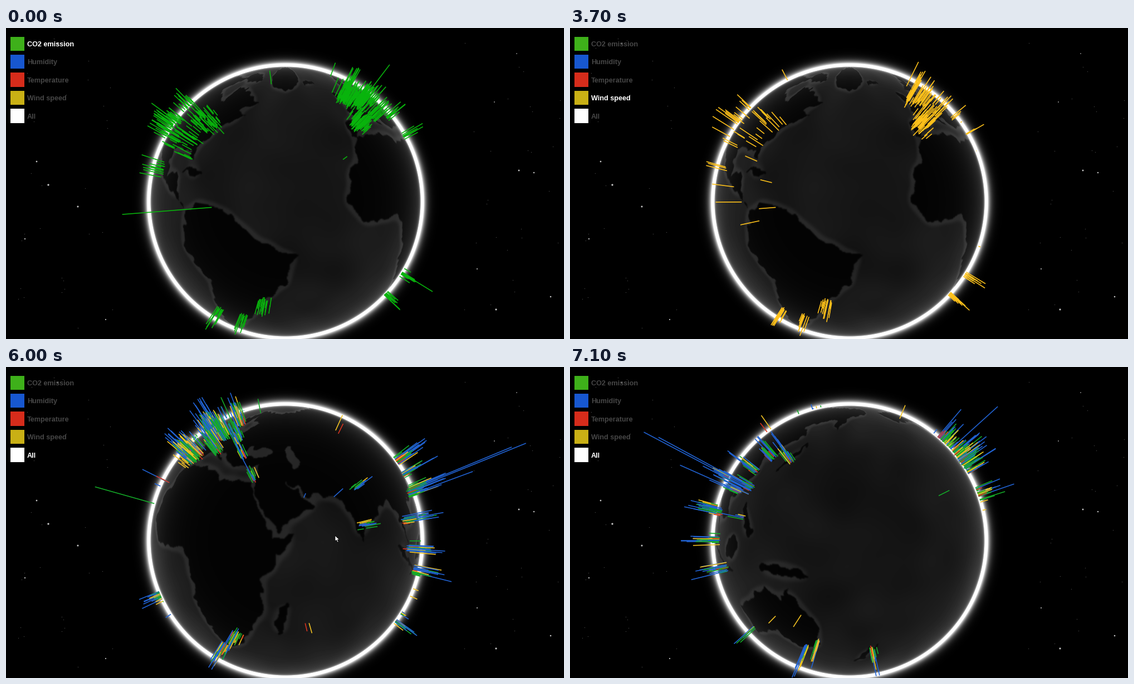
A matplotlib script that plays this animation: 1002 px wide and 559 px high, repeating every 7200 ms.

```python
import numpy as np
import matplotlib.pyplot as plt
from matplotlib.animation import FuncAnimation
from matplotlib.collections import LineCollection
from matplotlib.patches import Polygon, Rectangle
from matplotlib.path import Path

W, H, DPI = 1002, 559, 100
STEP, LOOP = 100, 7200
CX, CY, K = 502, 312, 240      # globe centre and projection scale
P = 0.2                        # globe radius / camera distance
RHO = 1 / np.sqrt(1 - P * P)   # horizon radius in units of K
RIM = K * RHO
PT = 72 / DPI
rng = np.random.default_rng(7)

# ---------- coastlines as (lon, lat) ----------
N_AMERICA = [
    (-168, 66), (-128, 70), (-82, 68), (-94, 59), (-80, 51), (-78, 62), (-64, 58),
    (-56, 52), (-66, 49), (-61, 46), (-70, 42), (-76, 36), (-81, 31), (-80, 26),
    (-84, 30), (-97, 28), (-95, 18), (-88, 21), (-83, 10), (-78, 8), (-94, 16),
    (-106, 22), (-114, 31), (-110, 23), (-117, 32), (-124, 42), (-124, 48), (-140, 60),
    (-158, 57)]
S_AMERICA = [
    (-78, 8), (-72, 12), (-62, 10), (-50, 1), (-36, -5), (-39, -15), (-48, -26),
    (-57, -37), (-66, -46), (-69, -54), (-74, -50), (-70, -19), (-81, -5)]
AFRICA = [
    (-6, 36), (10, 37), (20, 31), (33, 31), (43, 11), (51, 12), (40, -4), (40, -15),
    (33, -27), (26, -34), (19, -34), (12, -17), (13, -8), (9, 4), (-8, 4), (-17, 14),
    (-10, 30)]
EUROPE = [
    (-9, 37), (-9, 43), (-1, 44), (-4, 48), (8, 55), (21, 55), (29, 60), (22, 61),
    (24, 66), (17, 60), (13, 56), (6, 59), (25, 71), (46, 67), (46, 37), (28, 37),
    (23, 38), (13, 45), (17, 39), (9, 44), (0, 39), (-6, 36)]
ASIA = [
    (45, 68), (75, 73), (104, 77), (180, 69), (180, 64), (163, 60), (157, 51), (155, 59),
    (136, 54), (140, 48), (128, 42), (129, 35), (126, 38), (118, 39), (122, 31),
    (114, 22), (107, 20), (109, 12), (100, 13), (103, 1), (98, 15), (91, 22), (80, 15),
    (77, 8), (72, 21), (67, 25), (57, 26), (48, 30), (56, 25), (59, 22), (45, 13),
    (35, 28), (36, 37), (45, 40)]
AUSTRALIA = [
    (114, -22), (116, -34), (131, -31), (140, -38), (149, -38), (153, -27), (146, -19),
    (142, -11), (138, -17), (132, -12), (122, -18)]
LAND = [N_AMERICA, S_AMERICA, AFRICA, EUROPE, ASIA, AUSTRALIA]

# leaning ellipses: lon, lat, half width, half height, lean
ISLANDS = [
    (-40, 72, 14, 12, 0), (-74, 69, 10, 4, -1), (-19, 65, 5, 1.3, 0), (-2.5, 54, 2.3, 4.2, -.4),
    (-79, 22, 5, 1, -1), (46.5, -19, 2.2, 7, .25), (101, -.5, 1.6, 6, -1.1),
    (110, -7.4, 5, .8, 0), (114, 1, 4, 4.5, .5), (123, 12, 1.8, 6, -.4),
    (140, -5.5, 9, 2.4, -1.5), (137.5, 37, 1.6, 6, .9), (173, -41, 1.5, 6, .8)]
SEAS = [(34, 43.5, 7, 2.2, 0), (51, 41.5, 2, 5, -.3)]

# ---------- stations: lat, lon, count; quantities share them by a mix ----------
EUROPE_SITES = [(52.5, -1.5, 130), (50.5, 8, 165), (43.5, 11.5, 45), (59, 14, 40),
                (50, 21, 45), (41, 28, 20), (32, 35, 20)]
AMERICA_SITES = [(40.5, -75.5, 45), (41.5, -86, 55), (33.5, -84, 40), (31.5, -97, 34),
                 (39.5, -106, 20), (35.5, -119.5, 70), (47, -121.5, 24), (27.5, -81.5, 9),
                 (20, -100, 26)]
WINDY_SITES = [(40.2, -3.5, 180), (-34, -71, 34), (-35, -59.5, 28), (-25, -48.5, 50),
               (-26.3, 28, 32), (-33.7, 18.9, 34), (-37.5, 145, 18), (-33.8, 151, 14),
               (-38, 175.5, 18), (-32, 116, 7)]
EAST_SITES = [(27.5, 77, 14), (14, 76.5, 16), (13.8, 100.5, 18), (3, 102, 26),
              (-6.8, 109, 24), (22.8, 113.8, 20), (24, 120.8, 24), (31, 120.5, 18),
              (36.8, 127.5, 18), (35.2, 137.5, 26), (13, 121.5, 6)]
GROUPS = [(EUROPE_SITES, .17, (.52, .22, .13, .13)), (AMERICA_SITES, .34, (.48, .2, .2, .12)),
          (WINDY_SITES, .15, (.37, .23, .1, .3)), (EAST_SITES, .19, (.4, .36, .14, .1))]
RANGES = [(.05, .12), (.07, .2), (.03, .06), (.06, .13)]   # lowest bar, spread

# lone stations: lat, lon, height
CO2 = [(10.5, -67, .82), (64, -51.7, .1), (69, 20, .1), (-26, 28, .25), (52, 18, .3),
       (28, -16, .06), (38.5, -106, .24), (21.3, -157.8, .1)]
HUMIDITY = [(42.5, -112, .445), (18.5, -99.5, .324), (-12, -77, .18), (18.4, -66, .22),
            (9, -79.5, .22), (28, -16, .2), (64, -22, .09), (24, 120.8, .81),
            (24.4, 121, .72), (22.5, 114, .45), (25, 67, .15), (25, 55, .08)]
HEAT = [(28, -15, .1), (-21, 55.5, .08), (53, 83, .08)]
WIND = [(61, -150, .1), (4.7, -74, .17), (10.5, -67, .18), (14.6, -90.5, .16),
        (10, -84, .2), (19, -70, .12), (55, 83, .12), (-21, 57, .1), (-23.7, 134, .08),
        (-22, 146, .13)]

SOLO = ["#08b40c", "#0a5fff", "#ff2a12", "#ffc21a"]
MIXED = ["#14aa28", "#2163d4", "#d93420", "#f3c322"]

LEGEND = [("CO2 emission", "#3eb01a"), ("Humidity", "#1757cf"), ("Temperature", "#d62c1b"),
          ("Wind speed", "#c9b015"), ("All", "#ffffff")]

# brightest first
STARS = [(76, 282), (880, 506), (129, 321), (921, 256), (55, 240), (978, 483), (948, 260),
         (34, 379), (179, 524), (846, 433), (93, 28), (877, 133), (917, 46)]

SWITCHES = [900, 2200, 3700, 5300]
START = (-39.5, 14.1)
TURNS = [(5700, 6000, 48, 10), (6100, 6600, 151.5, 6),
         (6700, 6900, 160, 6), (7000, 7100, 165, 6)]
CURSOR = [(5700, 621, 326), (6000, 591, 303), (6100, 591, 303), (6600, 223, 290)]
CURSOR_ON, CURSOR_OFF = 5300, 6800


# ---------- earth texture ----------
TH, TW = 540, 1080


def blur(a, s):
    fy = np.fft.fftfreq(TH)[:, None]
    fx = np.fft.rfftfreq(TW)
    kernel = np.exp(-2 * (np.pi * s) ** 2 * (fx ** 2 + fy ** 2))
    return np.fft.irfft2(np.fft.rfft2(a) * kernel, s=(TH, TW))


def noise(s):
    n = blur(rng.standard_normal((TH, TW)), s)
    return n / n.std()


def smooth(u):
    u = np.clip(u, 0, 1)
    return u * u * (3 - 2 * u)


def earth_texture():
    lon, lat = np.meshgrid((np.arange(TW) + .5) * 360 / TW - 180,
                           90 - (np.arange(TH) + .5) * 180 / TH)
    lon, lat = lon + .6 * noise(3), lat + .5 * noise(3)
    pts = np.column_stack([lon.ravel(), lat.ravel()])

    def ellipse(x, y, rx, ry, lean):
        return ((lon - x - lean * (lat - y)) / rx) ** 2 + ((lat - y) / ry) ** 2 < 1

    land = np.zeros((TH, TW), bool)
    for poly in LAND:
        land |= Path(poly).contains_points(pts).reshape(TH, TW)
    for isle in ISLANDS:
        land |= ellipse(*isle)
    for sea in SEAS:
        land &= ~ellipse(*sea)
    land = land.astype(float)
    shelf = smooth((blur(land, 7) + .02 * noise(6) - .12) / .25)
    ocean = .085 + .06 * shelf + .007 * noise(14)
    cover = np.clip(blur(land, .6), 0, 1)
    return ocean * (1 - cover) + .012 * cover


TEXTURE = earth_texture()

gx, gy = np.meshgrid(np.arange(W) + .5 - CX, CY - np.arange(H) - .5)
R = np.hypot(gx, gy)
outer, inner = np.maximum(R - 248, 0), np.maximum(243.5 - R, 0)
RING = np.exp(-outer / 5 - inner / 1.3)
DISC = R < RIM
q = (R[DISC] / K) ** 2
SZ = (P * q + np.sqrt(np.maximum(1 - q / RHO ** 2, 0))) / (1 + P * P * q)
SX, SY = (g[DISC] / K * (1 - P * SZ) for g in (gx, gy))


def sample(lon, lat):
    u = (lon + 180) % 360 * TW / 360 - .5
    v = np.clip((90 - lat) * TH / 180 - .5, 0, TH - 1.001)
    i, j = np.floor(u).astype(int), v.astype(int)
    fu, fv = u - i, v - j
    i0, i1 = i % TW, (i + 1) % TW
    top = TEXTURE[j, i0] * (1 - fu) + TEXTURE[j, i1] * fu
    low = TEXTURE[j + 1, i0] * (1 - fu) + TEXTURE[j + 1, i1] * fu
    return top * (1 - fv) + low * fv


cache = {}


def globe(view):
    if view not in cache:
        lon0, lat0 = view
        c, s = np.cos(np.radians(lat0)), np.sin(np.radians(lat0))
        lat = np.degrees(np.arcsin(np.clip(SY * c + SZ * s, -1, 1)))
        lon = lon0 + np.degrees(np.arctan2(SX, SZ * c - SY * s))
        img = np.zeros((H, W))
        img[DISC] = sample(lon, lat) + .7 * (1.05 - SZ) ** 3
        cache[view] = np.clip(img + RING, 0, 1)
    return cache[view]


# ---------- bars ----------
def make_bars():
    rows = []
    for sites, spread, mix in GROUPS:
        for lat, lon, count in sites:
            sd = spread * np.sqrt(count)
            for kind, share in enumerate(mix):
                n = round(count * share)
                lo, span = RANGES[kind]
                rows += zip([kind] * n, rng.normal(lat, .9 * sd, n),
                            rng.normal(lon, 1.2 * sd, n), lo + span * rng.random(n) ** 1.4)
    for kind, lone in enumerate((CO2, HUMIDITY, HEAT, WIND)):
        rows += [(kind, *site) for site in lone]
    return np.array(rows).T


KIND, LAT, LON, HEIGHT = make_bars()
KIND = KIND.astype(int)


def bars(view, mode):
    lon0, lat0 = np.radians(view)
    lat, d = np.radians(LAT), np.radians(LON) - lon0
    x = np.cos(lat) * np.sin(d)
    y = np.sin(lat) * np.cos(lat0) - np.cos(lat) * np.sin(lat0) * np.cos(d)
    z = np.sin(lat) * np.sin(lat0) + np.cos(lat) * np.cos(lat0) * np.cos(d)
    # behind the horizon only the part beyond the rim shows
    reach = np.hypot(x, y) + P * z * RHO
    start = np.where(z > P, 1, np.where(reach > .05, RHO / np.maximum(reach, .05), 99))
    end = 1 + HEIGHT
    show = end > start
    if mode < 4:
        show &= KIND == mode
    idx = np.flatnonzero(show)
    idx = idx[np.argsort(z[idx])]

    def project(a):
        k = K * a[idx] / (1 - P * a[idx] * z[idx])
        return np.column_stack([CX + k * x[idx], CY - k * y[idx]])

    palette = MIXED if mode == 4 else SOLO
    return np.stack([project(start), project(end)], axis=1), [palette[k] for k in KIND[idx]]


def view_at(t):
    lon, lat = START
    for t0, t1, lon1, lat1 in TURNS:
        u = float(smooth((t - t0) / (t1 - t0)))
        lon, lat = lon + (lon1 - lon) * u, lat + (lat1 - lat) * u
    return round(lon, 3), round(lat, 3)


# ---------- stage ----------
fig = plt.figure(figsize=(W / DPI, H / DPI), dpi=DPI, facecolor="black")
ax = fig.add_axes([0, 0, 1, 1])
ax.axis("off")
picture = ax.imshow(globe(START), cmap="gray", vmin=0, vmax=1, extent=(0, W, H, 0),
                    aspect="auto", interpolation="nearest")
ax.set_xlim(0, W)
ax.set_ylim(H, 0)

sx, sy = np.array(STARS).T
ax.scatter(sx, sy, s=(np.linspace(3.3, 1.6, len(STARS)) * PT) ** 2, c="#c4c4c4", linewidths=0)
fx, fy = rng.uniform(0, W, 130), rng.uniform(0, H, 130)
far = np.abs(fx - CX) > 310
ax.scatter(fx[far], fy[far], s=(1.3 * PT) ** 2, c="#4a4a4a", linewidths=0)

lines = LineCollection([], linewidths=1.6 * PT, capstyle="butt", zorder=3)
ax.add_collection(lines)

labels = []
for row, (name, color) in enumerate(LEGEND):
    y = 28.5 + 32.4 * row
    ax.add_patch(Rectangle((8, y - 13), 25.5, 25.5, fc=color, lw=0, zorder=4))
    labels.append(ax.text(38, y + 4.6, name, family="Liberation Sans", weight="bold",
                          size=12.6 * PT, zorder=4))

ARROW = np.array([(0, 0), (0, 10), (2.4, 8), (4.2, 12), (6, 11.2), (4.2, 7.4), (7.4, 7.2)])
cursor = Polygon(ARROW, fc="white", ec="black", lw=.5, zorder=5)
ax.add_patch(cursor)


def update(i):
    t = i * STEP
    mode = sum(t >= s for s in SWITCHES)
    view = view_at(t)
    picture.set_data(globe(view))
    segments, colors = bars(view, mode)
    lines.set_segments(segments)
    lines.set_color(colors)
    for k, label in enumerate(labels):
        label.set_color("white" if k == mode else "#464646")
    times, xs, ys = zip(*CURSOR)
    cursor.set_xy(ARROW + (np.interp(t, times, xs), np.interp(t, times, ys)))
    cursor.set_visible(CURSOR_ON <= t < CURSOR_OFF)
    return picture, lines, cursor, *labels


anim = FuncAnimation(fig, update, frames=LOOP // STEP, interval=STEP,
                     repeat=True, repeat_delay=0, blit=False)
plt.show()
```
